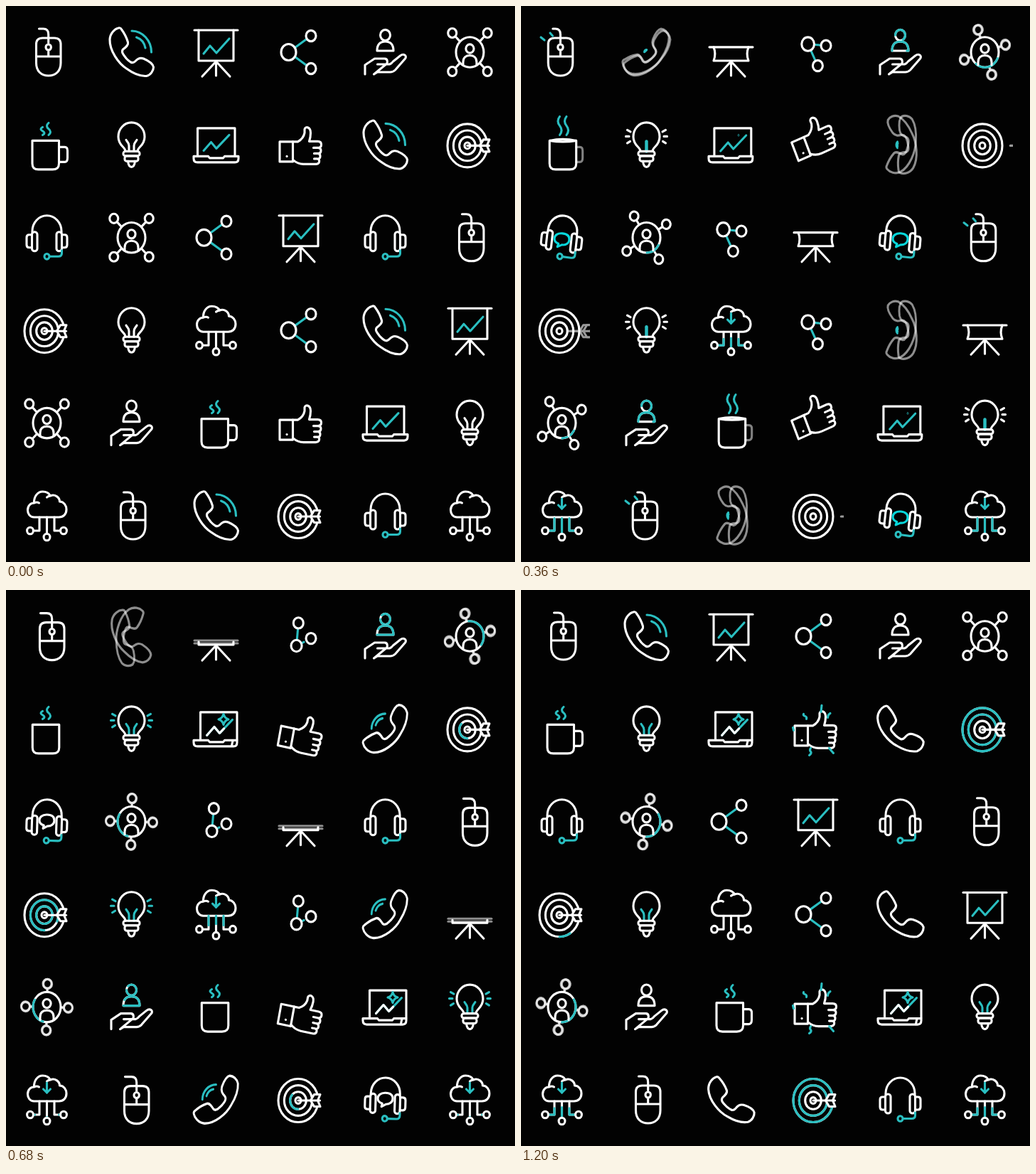
An HTML page that plays this animation: 716x782 px, repeating every 1240 ms.

```html
<!DOCTYPE html>
<html lang="en">
<head>
<meta charset="utf-8">
<title>Office icons</title>
<style>
html, body { margin: 0; width: 100%; height: 100%; overflow: hidden; background: #020202; }
svg { display: block; width: 100vw; height: 100vh; }
</style>
</head>
<body>
<svg id="stage" viewBox="0 0 716 782" preserveAspectRatio="none" fill="none" stroke="#fff"
  stroke-width="3.1" stroke-linecap="round" stroke-linejoin="round">
  <defs><clipPath id="cell"><rect x="-41" y="-43" width="80.5" height="86.5"/></clipPath></defs>
  <g id="icons"></g>
</svg>
<script>
const LOOP = 1240, STEP = 40, TALL = 1.09;
const TEAL = '#2abfc1', CYAN = '#08d6da', WHITE = '#fff', BG = '#020202';
// A digit after a name picks the timing variant
const GRID = [
  'mouse phone0 board share hand network0',
  'cup bulb laptop thumb phone1 target1',
  'headset0 network1 share board headset1 mouse',
  'target0 bulb cloud0 share phone1 board',
  'network1 hand cup thumb laptop bulb',
  'cloud1 mouse phone1 target1 headset0 cloud1'
].map(row => row.split(' '));

// Timing: ramp, smooth ramps, trapezoid, half sine, and a swing that winds up first
const ramp = (t, a, b) => Math.max(0, Math.min(1, (t - a) / (b - a)));
const smooth = (t, a, b) => { const p = ramp(t, a, b); return p * p * (3 - 2 * p); };
const smoother = (t, a, b) => { const p = ramp(t, a, b); return p * p * p * (10 - 15 * p + 6 * p * p); };
const hold = (t, a, b, d) => ramp(t, a, a + d) - ramp(t, b, b + d);
const hump = (t, a, b) => Math.sin(Math.PI * ramp(t, a, b));
const within = (t, a, b) => t >= a && t < b;
function swing(t, a, b) {
  const p = ramp(t, a, b), x = 2 * Math.min(p, 1 - p), y = x * x * (2.5 * x - 1.5) / 2;
  return p < .5 ? y : 1 - y;
}
const mix = (a, b, p) => a + (b - a) * p;
const rad = a => a * Math.PI / 180;

const path = (d, col = WHITE, more = '') => `<path d="${d}" stroke="${col}" ${more}/>`;
const oval = (x, y, r, col = WHITE, more = '') =>
  `<ellipse cx="${x}" cy="${y}" rx="${r}" ry="${r * TALL}" stroke="${col}" ${more}/>`;
const group = (body, tf = '', more = '') => `<g transform="${tf}" ${more}>${body}</g>`;
const fade = (body, o) => `<g opacity="${o}">${body}</g>`;
const spin = (a, x = 0, y = 0) =>
  `translate(${x} ${y}) scale(1 ${TALL}) rotate(${a}) scale(1 ${1 / TALL}) translate(${-x} ${-y})`;
// The part of a path between two fractions of its length
const part = (d, a, b, col = TEAL) => b - a < .005 ? '' :
  path(d, col, `pathLength="1" stroke-dasharray="${b - a} 2" stroke-dashoffset="${-a}"`);
function arc(x, y, r, from, to) {
  if (to - from < 1) return '';
  to = Math.min(to, from + 359.9);
  const at = a => `${x + r * Math.cos(rad(a))} ${y + r * TALL * Math.sin(rad(a))}`;
  return path(`M${at(from)}A${r} ${r * TALL} 0 ${to - from > 180 ? 1 : 0} 1 ${at(to)}`, TEAL);
}
// Two faint copies when the turn between neighbouring moments is large
function smear(body, angle, t, gap, limit, o) {
  const a = angle(t - gap), b = angle(t + gap);
  return Math.abs(a - b) > limit
    ? fade(group(body, spin(a)), o) + fade(group(body, spin(b)), o)
    : group(body, spin(angle(t)));
}

const icons = {
  mouse(t) {
    const x = -5.5 * Math.sin(2 * Math.PI * ramp(t, 0, 1000));
    const y = 5 * hump(t, 420, 690) - 3 * hump(t, 60, 300);
    const press = within(t, 120, 240);
    const body = (press ? path('M2-20H-6Q-15-20-15-11V6H2Z', TEAL, `fill="${TEAL}"`) : '') +
      path('M-15-11Q-15-20-6-20H10.5Q19.5-20 19.5-11V15C19.5 27 12 33 2.2 33S-15 27-15 15ZM-15 6H19.5M2.2-20V-13M2.2-1V6') +
      oval(2.2, -7, 3.7, WHITE, `fill="${BG}"`);
    return group(body, `translate(${x} ${y})`) +
      path(`M${2.2 + x} ${-20 + y}V${-25 + y}Q${2.2 + x} ${-33 + y} ${-5 + x} ${-33 + y}H${-11 + x * .4}`) +
      (press ? path('M-24-7h5', TEAL) : '') +
      (within(t, 240, 440) ? path('M-29.5-21l5 4M-16.5-27l3.5 4', TEAL) : '');
  },

  phone(t, v) {
    const angle = v
      ? u => 270 * (swing(u, 60, 560) - swing(u, 785, 1245))
      : u => 270 * (swing(u, 90, 390) - swing(u, 505, 785));
    const w = 1 - (v ? hold(t, 200, 540, 200) + ramp(t, 900, 980)
      : hold(t, 200, 350, 90) + hold(t, 570, 840, 80));
    const body = path('M-18.5-34C-23-33-30-27-30.5-18C-31-2-18 16-7 23C4 31 14 34 21 33.5C27 32 31 26 31 21C30 16 24 12 17 9C11 7 8 10 5 13C1 17-3 13-7 9C-11 4-15 0-12-4C-8-7-4-10-5-14C-7-21-11-28-14-32C-15-34-17-34.5-18.5-34Z');
    const waves = w < .04 ? '' : path(
      `M${.5 * w} ${-30 * w}A${28 * w} ${30 * w} 0 0 1 ${28 * w} 0M${7 * w} ${-21 * w}A${19 * w} ${20 * w} 0 0 1 ${19.5 * w} ${-6 * w}`, TEAL);
    return smear(body, angle, t, 12, 5, .55) + group(waves, spin(angle(t)));
  },

  board(t) {
    const drop = Math.sin(Math.PI * t / LOOP) ** 2.2, y = -31 + 40 * drop;
    const bow = 4 * Math.sin(Math.PI * drop), mid = (y + 12) / 2;
    const bar = h => path(`M-30.5 ${h}H30.5`);
    return path(`M-24.5 ${y}Q${-24.5 + bow} ${mid}-24.5 12H24.5Q${24.5 - bow} ${mid} 24.5 ${y}`) +
      (drop > .9 ? fade(bar(y - 2) + bar(y + 2), .55) : bar(y)) +
      path('M0 13V33M-1 14L-19.5 34M1 14L19.5 34') +
      part('M-17.5 2L-8.5-9L.5 1L18.5-19', 0, 1 - hold(t, 20, 860, 280));
  },

  // Each node travels to the next corner, bowed outwards
  share(t) {
    const p = ramp(t, 0, 1200), corners = [[-17, 0], [14.5, -23], [14.5, 23]], bows = [7, 0, 4.5];
    const [a, b, c] = corners.map(([x, y], i) => {
      const [u, w] = corners[(i + 1) % 3], len = Math.hypot(u - x, w - y);
      const out = bows[i] * Math.sin(Math.PI * p) / len;
      const nx = mix(x, u, p) + (w - y) * out, ny = mix(y, w, p) - (u - x) * out;
      return [nx, ny, 7 + 3.5 * ramp(-nx, 4, 17)];
    });
    const link = (m, n, grow = 1) => {
      const dx = n[0] - m[0], dy = n[1] - m[1], len = Math.hypot(dx, dy);
      const f = (m[2] + 1.5) / len, g = mix(f, 1 - (n[2] + 1.5) / len, grow);
      return g <= f ? '' : path(`M${m[0] + dx * f} ${m[1] + dy * f}L${m[0] + dx * g} ${m[1] + dy * g}`, TEAL);
    };
    return link(a, c) + (t < 620 ? link(a, b) : link(c, b, ramp(t, 590, 760))) +
      [a, b, c].map(n => oval(...n)).join('');
  },

  hand(t) {
    const outline = ['M-7-24A7 7.6 0 0 1 7-24A7 7.6 0 0 1-7-24Z', 'M-11.5-2C-11.5-11-7-15 0-15S11.5-11 11.5-2Z'];
    return outline.map(d => path(d) + part(d, ramp(t, 620, 1080), ramp(t, 40, 520))).join('') +
      path('M-28.5 31V18L-15 9H-1C4 9 4 17 0 17H-11M1 17H6Q9 16 11 13L21 5C26 1 31 5 28 9L14 25Q11 28 7 28H-11L-16 31Z');
  },

  network(t, v) {
    const p = t / 1200;
    const angle = v ? u => 145 * (u / 1200) ** 2 : u => 180 * smoother(u, 60, 1100);
    const from = v ? 330 * p * p : 540 * smooth(t, 250, 1120);
    const to = v ? 450 * p ** 1.35 : 540 * smooth(t, 60, 1000);
    const r = 35 - 5 * Math.min(1, 2 * Math.max(0, Math.sin(rad(angle(t)))));
    const nodes = [45, 135, 225, 315].map(g => {
      const x = Math.cos(rad(g)), y = Math.sin(rad(g)) * TALL;
      return path(`M${20 * x} ${20 * y}L${(r - 6.5) * x} ${(r - 6.5) * y}`) + oval(r * x, r * y, 6);
    }).join('');
    return smear(nodes, angle, t, 5, 1.2, .7) +
      oval(0, 0, 19.5) + arc(0, 0, 19.5, from, to) + oval(0, -5, 5.6) +
      path('M-9.5 18V14C-9.5 7-5 4.5 0 4.5S9.5 7 9.5 14V18');
  },

  cup(t) {
    const x = 4.3 * hump(t, 240, 690) - 2.5 * hump(t, 40, 260), tilt = -3 * hump(t, 40, 280);
    const h = 12 * Math.cos(2 * Math.PI * ramp(t, 0, 740) ** 3);
    const edge = h > 0 ? 17 : -20.5, k = Math.min(4, Math.abs(h) / 2) * Math.sign(h);
    const turned = within(t, 300, 640), back = within(t, 480, 640);
    const handle = Math.abs(h) < 2 ? '' :
      path(`M${edge} 3H${edge + h - k}Q${edge + h} 3 ${edge + h} 8V18Q${edge + h} 24 ${edge + h - k} 24H${edge}`);
    const body = path(`M-20.5-6V26Q-20.5 34.5-12 34.5H8Q17 34.5 17 26V-6${turned ? 'Q-2-10-20.5-6Q-2-3 17-6' : 'Z'}`) +
      fade(handle, turned ? .5 : 1) +
      (back ? fade(path('M-8.5 1Q-10 4-10 8V20Q-10 25-8 26'), .5) : '');
    const lift = hold(t, 60, 560, 120);
    const steam = (sx, top) => {
      const m = (-14 - top) / 2;
      return path(`M${sx} ${top}q-5 ${m / 2} 0 ${m}t0 ${m}`, TEAL, back ? 'stroke-dasharray="6 6"' : '');
    };
    return group(body, `translate(${x} 0) ` + spin(tilt, 0, 15)) +
      steam(-6 + 3 * lift, -25 - 15 * lift) + steam(2.5 + 4 * lift, -31 - 9 * lift);
  },

  bulb(t) {
    const wire = ['M-3.5 9V1C-3.5-3-6-4-7.5-7', 'M3.5 9V1C3.5-3 6-4 7.5-7'];
    let glow;
    if (t < 280) glow = wire.map(d => path(d) + part(d, 0, ramp(t, 100, 400))).join('');
    else if (t < 440) glow = path(`M0 9V${-5 * ramp(t, 240, 360)}`, TEAL, 'stroke-width="4.5"');
    else glow = wire.map(d => part(d, 0, ramp(t, 300, 540))).join('');
    const ray = 'M-27-21l4.5 2.5M-29-12h4.5M-27-2.5l4-2.5M27-21l-4.5 2.5M29-12h-4.5M27-2.5l-4-2.5';
    return glow + path('M-8.5 9C-8.5 3-18.5 1-18.5-11.5A18.5 20 0 0 1 18.5-11.5C18.5 1 8.5 3 8.5 9M-5 23Q-4 31 0 31Q4 31 5 23') +
      '<rect x="-11.5" y="9" width="23" height="6.5" rx="3"/><rect x="-9.5" y="15.5" width="19" height="7.5" rx="3"/>' +
      (within(t, 300, 800) ? path(ray, t < 440 ? WHITE : TEAL) : '');
  },

  laptop(t) {
    const u = ramp(t, 120, 520), right = 31.5 - 2 * u, star = ramp(t, 320, 520);
    const zig = 'M-17.5 8L-7-4L.5 5L18.5-14';
    return path(`M${-26 + 4 * u} 15V-23.5H${26.5 + 3 * u}V15`) +
      path(`M-31.5 16H-11L-9 18.5H10L12 16H${right}V19Q${right} 24.5 ${right - 5} 24.5H-26Q-31.5 24.5-31.5 19Z`) +
      (u > .8 ? path('M23.5 17Q22.5 20 22 24') : '') +
      group(path(zig, TEAL) + part(zig, 0, .68 * ramp(t, 580, 680), WHITE), `translate(${4.5 * u} ${u})`) +
      (star ? group(path('M0-7.5Q1.5-1.5 7-0Q1.5 1.5 0 7.5Q-1.5 1.5-7 0Q-1.5-1.5 0-7.5Z', TEAL),
        `translate(10.5 -13.5) scale(${star})`) : '');
  },

  thumb(t) {
    const turn = spin(13 * hold(t, 560, 960, 140) - 24 * hump(t, 40, 560), -29, 8);
    const fist = path('M-11-4.5H-4Q4-9 5.5-17V-22C7-27 14-25 14-17Q14-11 12-5H24Q29-5 29-.5T24 4H18M24 4Q28.5 4 28.5 8T24 12H19M24 12Q27.5 12 27.5 16T23 19.5H19M23 19.5Q27 20 26 24Q25 27 21 27H4Q-4 27-11 21');
    const cuff = path('M-29.5-4.5H-11V23.5H-29.5Z') + path('M-19.5 16h.1');
    const rays = ['M-13-14Q-12-17-15-18T-17-21', 'M7.5-24L8.5-33', 'M17-16Q17-20 20.5-22', 'M-7 27Q-9 30-7 32T-9 37', 'M19 27L25 34', 'M-31 2L-32-2'];
    return group(cuff + fist, turn) + rays.map(d => part(d, 0, ramp(t, 860, 1160))).join('');
  },

  target(t, v) {
    const x = -3.5, y = 1;
    const rings = [0, 1, 2].map(i => {
      const r = 11.3 + 8.35 * i, on = 480 + 110 * i + 160 * v, off = 790 + 155 * i + 260 * v;
      return oval(x, y, r) + arc(x, y, r, 90 + 360 * ramp(t, off, off + 110), 90 + 360 * ramp(t, on, on + 110));
    }).join('');
    const fall = Math.max(0, t - 40) / 120, fly = v ? ramp(t, 320, 600) : ramp(t, 300, 400);
    const gone = t < 270, dx = gone ? 0 : 52 * (1 - fly) ** 1.5;
    const arrow = path('M14 1L19-7.5H27.5L24 1L27.5 9.5H19Z', WHITE, `fill="${BG}"`) + path('M-3.5 1H27');
    const pose = n => group(arrow, `translate(${dx + n} ${gone ? 18 * fall * fall : 0}) ` +
      spin(gone ? 46 * Math.min(1, fall) : 0, x, y));
    return group(rings + oval(x, y, 4) +
      (dx > 1 ? fade(pose(-2) + pose(3), .6) : pose(0)), '', 'clip-path="url(#cell)"');
  },

  headset(t, v) {
    const tilt = v ? 5 * hump(t, 180, 540) : 8 * hump(t, 180, 720);
    const rise = v ? ramp(t, 380, 560) : ramp(t, 580, 860);
    const show = hold(t, 90, v ? 560 : 900, 110);
    const cups = '<rect x="-21" y="-8" width="7.5" height="27" rx="3.6"/>' +
      path('M-21-4H-25Q-28.5-4-28.5 0V10Q-28.5 14-25 14H-21');
    const col = !v && within(t, 640, 760) ? WHITE : within(t, 340, 620) ? CYAN : TEAL;
    const bubble = path('M0-8C7-8 10.5-5 10.5 0S6 8 1 8L-5 11.5L-4 7C-8 6-10.5 4-10.5 0S-7-8 0-8Z', col);
    return group(path('M-20.5-7V-9A20.5 22 0 0 1 20.5-9V-7') + cups + group(cups, 'scale(-1 1)') +
      path('M21 18V22Q21 26.5 16 26.5H4', TEAL) + oval(0, 26.5, 3.5, TEAL), spin(tilt)) +
      fade(group(bubble, `translate(0 ${2 - 10.5 * rise}) rotate(${tilt})`), show);
  },

  cloud(t, v) {
    const len = v ? 270 : 200, starts = v ? [70, 800] : [60, 580];
    const shaft = v ? ramp(t, 160, 300) : hold(t, 160, 750, 110);
    const tip = v ? ramp(t, 100, 220) : hold(t, 100, 900, 80);
    const lines = ['M-10.5 2V21H-18', 'M0 2V25', 'M10.5 2V21H18'];
    return path('M-18 2C-24 2-27-3-27-8C-27-14-23-18-18-18C-18.5-27-13-34-6-34C-1-34 3-32 5-28C11-31 18-26 18-20C24-20 27.5-14 27.5-9C27.5-2 23 2 17 2ZM-18-18Q-14-20-11-18M5-28Q2-28 0-26') +
      lines.map(d => path(d) + starts.map(s =>
        part(d, ramp(t, s + len, s + len * 2.3), ramp(t, s, s + len))).join('')).join('') +
      oval(-23.5, 21, 4.4) + oval(0, 30, 4.4) + oval(23.5, 21, 4.4) +
      part('M0-10V-24', 0, shaft) + part('M-5-15L0-10L5-15', 0, tip);
  }
};

const layer = document.getElementById('icons');
function draw(t) {
  layer.innerHTML = GRID.map((row, r) => row.map((name, c) => {
    const [, kind, v] = name.match(/([a-z]+)(\d?)/);
    return group(icons[kind](t, +v), `translate(${57.5 + 119 * c} ${65 + 130.4 * r})`);
  }).join('')).join('');
}

let start, shown = 0;
function tick(now) {
  start ??= now;
  const t = Math.floor((now - start) % LOOP / STEP) * STEP;
  if (t !== shown) draw(shown = t);
  requestAnimationFrame(tick);
}
draw(0);
requestAnimationFrame(tick);
</script>
</body>
</html>
```
